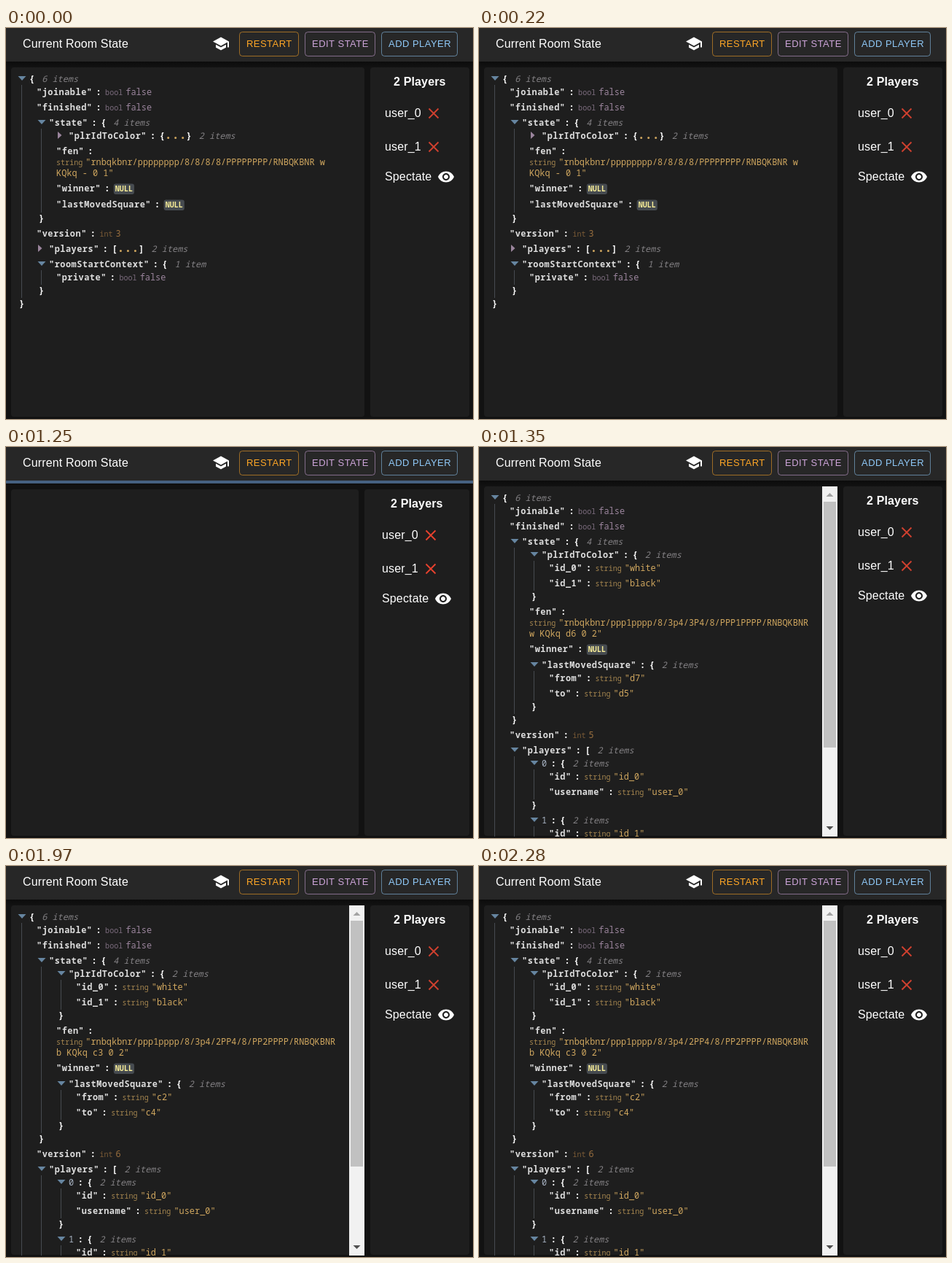
An HTML page with a canvas for the animation above (2380 ms loop, 641x536 px).

```html
<!DOCTYPE html>
<html lang="en">
<head>
<meta charset="utf-8">
<title>Room state</title>
<style>
html, body { margin: 0; width: 100%; height: 100%; overflow: hidden; background: #121212; }
canvas { display: block; width: 641px; height: 536px; }
</style>
</head>
<body>
<canvas id="stage" width="641" height="536"></canvas>
<script>
const ctx = document.getElementById('stage').getContext('2d');
const LOOP = 2380;
const SANS = '"Liberation Sans", Arial, sans-serif';
const MONO = '"Noto Sans Mono", "DejaVu Sans Mono", monospace';
const CELL = 7.147, KEY_CELL = CELL + 0.5, SMALL_CELL = 6.05;
const INDENT = 27;

const SCHOOL = new Path2D('M5 13.18v4L12 21l7-3.82v-4L12 17l-7-3.82zM12 3L1 9l11 6 9-4.91V17h2V9L12 3z');
const EYE = new Path2D('M12 4.5C7 4.5 2.73 7.61 1 12c1.73 4.39 6 7.5 11 7.5s9.27-3.11 11-7.5c-1.73-4.39-6-7.5-11-7.5zM12 17c-2.76 0-5-2.24-5-5s2.24-5 5-5 5 2.24 5 5-2.24 5-5 5zm0-8c-1.66 0-3 1.34-3 3s1.34 3 3 3 3-1.34 3-3-1.34-3-3-3z');

const color = {
  key: '#dddddd', brace: '#ffffff', index: '#a9b4c4', size: '#838184',
  bool: '#9b859d', int: '#9b703f', string: '#d0a75f',
  open: '#6685a0', closed: '#9b859d', line: '#464b50', nil: '#f9ee98'
};

function makeState(fen, version, from, to) {
  const started = Boolean(from);
  const players = [0, 1].map(i => ({ id: 'id_' + i, username: 'user_' + i }));
  return {
    started,
    tree: {
      joinable: false,
      finished: false,
      state: {
        plrIdToColor: { id_0: 'white', id_1: 'black' },
        fen,
        winner: null,
        lastMovedSquare: started ? { from, to } : null
      },
      version,
      players,
      roomStartContext: { private: false }
    }
  };
}

const states = [
  makeState(['rnbqkbnr/pppppppp/8/8/8/8/PPPPPPPP/RNBQKBNR w', 'KQkq - 0 1'], 3),
  makeState(['rnbqkbnr/pppppppp/8/8/3P4/8/PPP1PPPP/RNBQKBNR', 'b KQkq d3 0 1'], 4, 'd2', 'd4'),
  makeState(['rnbqkbnr/ppp1pppp/8/3p4/3P4/8/PPP1PPPP/RNBQKBNR', 'w KQkq d6 0 2'], 5, 'd7', 'd5'),
  makeState(['rnbqkbnr/ppp1pppp/8/3p4/2PP4/8/PP2PPPP/RNBQKBNR', 'b KQkq c3 0 2'], 6, 'c2', 'c4')
];

// Start time and state; null is the loading view.
const schedule = [
  [0, states[0]], [410, states[1]], [1250, null],
  [1350, states[2]], [1870, null], [1970, states[3]]
];

function text(str, x, y, font, fill, spacing = 0) {
  ctx.font = font;
  ctx.letterSpacing = spacing + 'px';
  ctx.fillStyle = fill;
  ctx.fillText(str, x, y);
}

function mono(str, x, y, fill, style = '', size = 11.91, spacing = 0) {
  text(str, x, y + 4, `${style} ${size}px ${MONO}`, fill, spacing);
}

function box(x, y, w, h, fill, r = 0) {
  ctx.fillStyle = fill;
  ctx.beginPath();
  ctx.roundRect(x, y, w, h, r);
  ctx.fill();
}

function triangle(fill, ...p) {
  ctx.fillStyle = fill;
  ctx.beginPath();
  for (let i = 0; i < p.length; i += 2) ctx.lineTo(p[i], p[i + 1]);
  ctx.fill();
}

function icon(path, x, y) {
  ctx.save();
  ctx.translate(x, y);
  ctx.fillStyle = '#fff';
  ctx.fill(path);
  ctx.restore();
}

// Draws a key and its colon, returns where the value begins.
function drawKey(key, x, y, isIndex) {
  const label = isIndex ? key : `"${key}"`;
  mono(label, x, y, isIndex ? color.index : color.key, isIndex ? '' : 'bold', 11.91, 0.5);
  x += label.length * KEY_CELL + 5;
  mono(':', x, y, color.brace, 'bold');
  return x + KEY_CELL + 5;
}

function drawType(type, x, y) {
  ctx.globalAlpha = 0.75;
  mono(type, x, y, color[type], '', 10.08);
  ctx.globalAlpha = 1;
  return x + type.length * SMALL_CELL + 4;
}

// Row functions return the y of the row below.
function drawLeaf(key, value, depth, y) {
  const left = 15 + INDENT * depth;
  let x = drawKey(key, left, y);
  if (value === null) {
    box(x, y - 6.5, 28.2, 14.5, color.line, 3);
    mono('NULL', x + 2, y, color.nil, 'bold', 10.08);
    return y + 22;
  }
  if (Array.isArray(value)) {
    y += 15;
    x = drawType('string', left, y);
    mono('"' + value[0], x, y, color.string);
    y += 15;
    mono(value[1] + '"', left, y, color.string);
    return y + 21;
  }
  const type = { boolean: 'bool', number: 'int', string: 'string' }[typeof value];
  x = drawType(type, x, y);
  mono(type === 'string' ? `"${value}"` : String(value), x, y, color[type]);
  return y + 21;
}

function drawNode(key, value, depth, y, started, inArray) {
  const isList = Array.isArray(value) && typeof value[0] === 'object';
  if (value === null || typeof value !== 'object' || (Array.isArray(value) && !isList)) {
    return drawLeaf(key, value, depth, y);
  }
  const dx = INDENT * depth;
  const [open, close] = isList ? '[]' : '{}';
  const entries = Object.entries(value);
  const collapsed = !started && (key === 'players' || key === 'plrIdToColor');
  const ax = 22 + dx;
  let x = 32 + dx;
  if (key !== null) x = drawKey(key, x, y, inArray);
  mono(open, x, y, color.brace, 'bold');
  x += CELL;
  if (collapsed) {
    triangle(color.closed, ax - 5, y - 6, ax + 0.5, y - 1, ax - 5, y + 4);
    mono('...', x, y, color.string, 'bold', 16.5);
    x += 29.7;
    mono(close, x, y, color.brace, 'bold');
    x += CELL;
  } else {
    triangle(color.open, ax - 5.5, y - 4, ax + 5.5, y - 4, ax, y + 2);
  }
  const count = entries.length;
  mono(`${count} item${count > 1 ? 's' : ''}`, x + 10, y, color.size, 'italic');
  if (collapsed) return y + 21;

  const top = y + 8;
  y += 18;
  for (const [k, v] of entries) y = drawNode(k, v, depth + 1, y, started, isList);
  y -= 3;
  box(21 + dx, top, 1, y - 8 - top, color.line);
  mono(close, 18 + dx, y, color.brace, 'bold');
  return y + 21;
}

function drawScrollbar() {
  box(471, 54, 21, 480, '#f1f1f1');
  box(473, 75, 17, 337, '#c1c1c1');
  triangle('#a3a3a3', 476.5, 68, 481.5, 63, 486.5, 68);
  triangle('#505050', 476.5, 520, 486.5, 520, 481.5, 525);
}

function drawButton(label, x, w, rgb) {
  ctx.strokeStyle = `rgba(${rgb},.55)`;
  ctx.lineWidth = 1;
  ctx.beginPath();
  ctx.roundRect(x + 0.5, 5.5, w - 1, 33, 4);
  ctx.stroke();
  text(label, x + 10, 26, '13px ' + SANS, `rgb(${rgb})`, 0.46);
}

function drawHeader(loading) {
  const shade = ctx.createLinearGradient(0, 46, 0, 54);
  shade.addColorStop(0, 'rgba(0,0,0,.35)');
  shade.addColorStop(1, 'rgba(0,0,0,0)');
  box(0, 46, 641, 8, shade);
  box(0, 0, 641, 46, '#272727');
  if (loading) box(0, 46, 641, 4, '#466181');
  text('Current Room State', 23, 27, '16px ' + SANS, '#fff', 0.15);
  icon(SCHOOL, 283, 9.5);
  drawButton('RESTART', 320, 82, '255,167,38');
  drawButton('EDIT STATE', 410, 97, '206,165,218');
  drawButton('ADD PLAYER', 515, 105, '144,202,249');
}

function drawPlayers(loading) {
  ctx.save();
  if (loading) ctx.translate(-4, 4);
  text('2 Players', 532, 79, 'bold 16px ' + SANS, '#fff', 0.15);
  ctx.strokeStyle = loading ? '#e6412e' : '#cf402f';
  ctx.lineWidth = 1.9;
  [117, 163].forEach((y, i) => {
    text('user_' + i, 520, y + 5, '16px ' + SANS, '#fff', 0.15);
    ctx.beginPath();
    for (const s of [-1, 1]) {
      ctx.moveTo(587 - 6.5, y - 6.5 * s);
      ctx.lineTo(587 + 6.5, y + 6.5 * s);
    }
    ctx.stroke();
  });
  text('Spectate', 520, 209, '16px ' + SANS, '#fff', 0.15);
  icon(EYE, 592, 192);
  ctx.restore();
}

function draw(now) {
  const t = now % LOOP;
  const state = schedule.filter(([start]) => start <= t).pop()[1];
  const loading = !state;
  const top = loading ? 58 : 54;
  const edge = loading ? 484 : 492;

  box(0, 0, 641, 536, '#121212');
  drawHeader(loading);
  box(7, top, edge - 7, 533 - top, '#1e1e1e', 4);
  box(edge + 8, top, 628 - edge, 533 - top, '#1e1e1e', 4);
  drawPlayers(loading);

  if (state) {
    ctx.save();
    ctx.beginPath();
    ctx.rect(7, 54, 485, 480);
    ctx.clip();
    drawNode(null, state.tree, 0, 70, state.started);
    if (state.started) drawScrollbar();
    ctx.restore();
  }
}

const begin = performance.now();
function tick() {
  draw(performance.now() - begin);
  requestAnimationFrame(tick);
}
tick();
</script>
</body>
</html>
```
